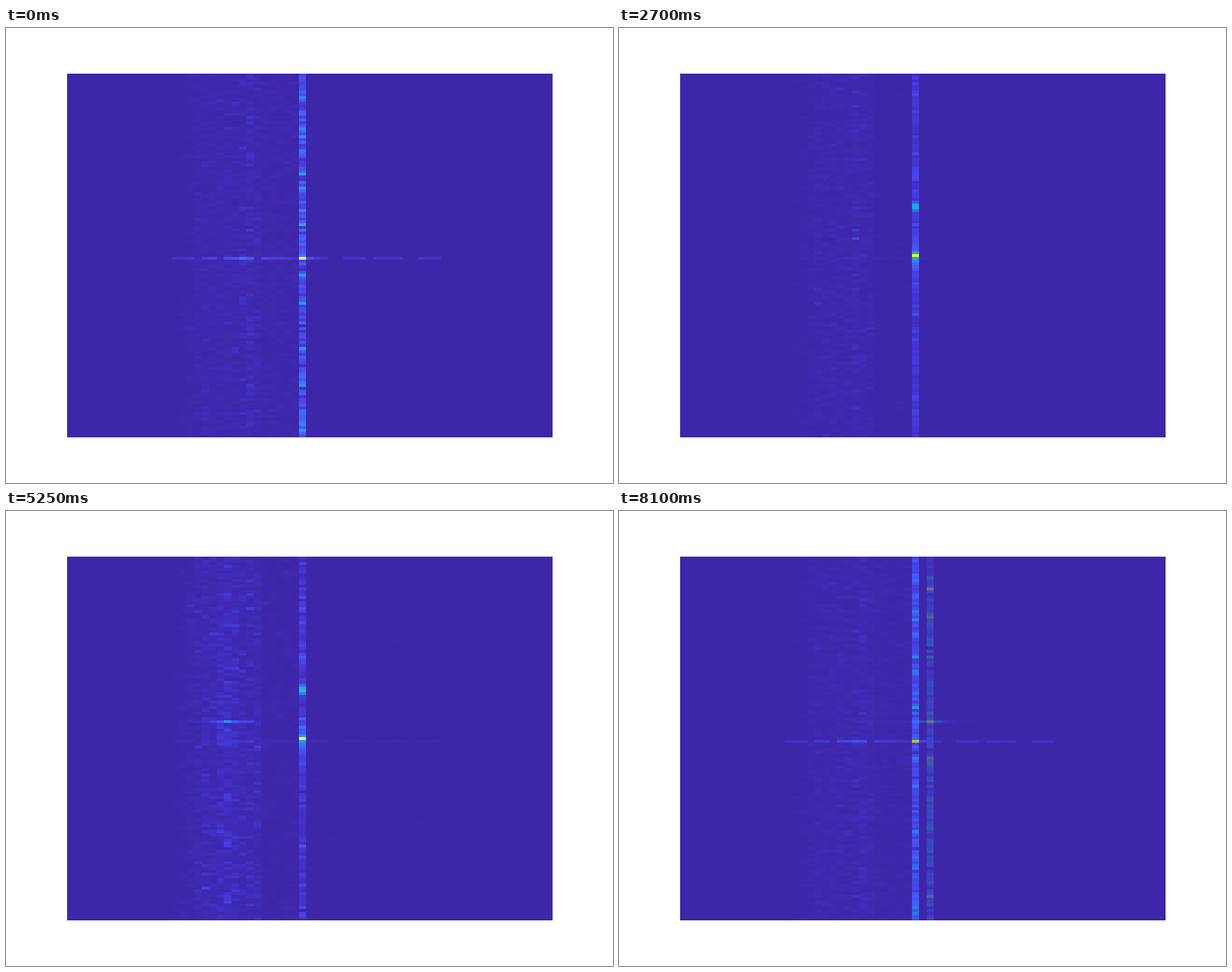
Animation, 864 px wide and 648 px high, one loop 8.25 s. Source, as a matplotlib script:

```python
import numpy as np
import matplotlib.pyplot as plt
from matplotlib.animation import FuncAnimation
from matplotlib.colors import LinearSegmentedColormap

WIDTH, HEIGHT, DPI = 864, 648, 100
ROWS, COLS = 129, 65
CENTRE, LINE_ROW, PEAK_ROW, ECHO_ROW, SIDE_ROW = 31, 65, 64, 46.6, 58
STEP_MS, STEPS_PER_SCENE, HOLD_STEPS = 150, 5, 3

rows, cols = np.arange(ROWS), np.arange(COLS)
parula = LinearSegmentedColormap.from_list("parula", [
    (0, "#3e26a8"), (.06, "#4537d5"), (.13, "#484df0"), (.2, "#4563fd"),
    (.26, "#317cfc"), (.33, "#2b91ee"), (.45, "#12b1d6"), (.5, "#1abebb"),
    (.6, "#48cb86"), (.7, "#9fc941"), (.8, "#ebbb30"), (.88, "#fec338"),
    (1, "#f9fb15")])


def falloff(positions, centre, width):
    return np.exp(-np.abs(positions - centre) / width)


def bump(positions, centre, width):
    return np.exp(-((positions - centre) / width) ** 2)


def speckle(seed, level, tail, ridge, gain, spread):
    """Faint noise left of the bright column, stronger around one ridge."""
    envelope = np.interp(cols, [13, 16, 18, 25, 26, 30, 31, 36, 49, 50],
                         [0, .5, 1, 1, tail, tail, .15, .1, .1, 0])
    envelope *= 1 + gain * bump(cols, ridge, spread) * (cols < 26)
    noise = np.random.default_rng(seed).gamma(2.5, .4, (ROWS, COLS))
    return level * envelope * noise


def column(seed, base, shape):
    return base * np.random.default_rng(seed).gamma(shape, 1 / shape, ROWS)


def dashes():
    """Broken horizontal line, brightest left of the column."""
    gaps = np.isin(cols, [17, 20, 25, 35, 36, 40, 45, 46])
    strength = .05 + .1 * bump(cols, 23, 4) + .08 * bump(cols, 32, .8)
    return strength * ((cols >= 14) & (cols < 50) & ~gaps)


def scene(seed, level, ridge, gain, spread, tail, line, wide=0):
    data = speckle(seed, level, tail, ridge, gain, spread)
    data[LINE_ROW] += line * dashes() + wide
    return data


def loud(seed, base, width, **look):
    """Strong, busy column with its peak on the line."""
    data = scene(seed, **look)
    data[:, CENTRE] = column(seed + 50, base, 4)
    data[:, CENTRE] += bump(rows, LINE_ROW, width)
    return data


def quiet(seed, echo, skirt, column_seed, side=(CENTRE, 0, 1), **look):
    """Weak column with a sharp peak, a second echo and a side reflection."""
    data = scene(seed, **look)
    pulse = bump(rows, PEAK_ROW, .6) + skirt * falloff(rows, PEAK_ROW + .6, 3)
    pulse += echo * bump(rows, ECHO_ROW, 1.4) + .06 * bump(rows, 35, 1.5)
    data[:, CENTRE] = column(column_seed, .06, 5) + pulse
    col, strength, reach = side
    data[SIDE_ROW] += strength * falloff(cols, col, reach) * (cols < 26)
    return data


def double(seed):
    """Second bright column to the right, peaking on the side row."""
    data = scene(seed, .008, 24, .3, 1, .8, .1)
    data[:, CENTRE] = column(seed + 50, .1, 5)
    data[:, CENTRE + 2] = column(seed + 51, .27, 3)
    data[SIDE_ROW] += falloff(cols, CENTRE + 2, .9) + .02 * (abs(cols - 36) < 14)
    return data


scenes = [
    loud(1, .17, .4, level=.012, ridge=24, gain=.8, spread=1, tail=.6, line=1),
    loud(2, .33, 1, level=.033, ridge=23, gain=.3, spread=2, tail=.55, line=1.6,
         wide=.015),
    loud(3, .24, 1, level=.028, ridge=23, gain=.3, spread=2, tail=.5, line=1.4,
         wide=.02),
    quiet(4, .4, .35, 60, (23, .08, .4), level=.009, ridge=23, gain=1, spread=.7,
          tail=.3, line=.1),
    quiet(4, .4, .35, 61, (23, .06, .4), level=.009, ridge=23, gain=1.2, spread=.7,
          tail=.3, line=.1),
    quiet(6, .45, .4, 62, (21, .1, 1), level=.024, ridge=22, gain=.4, spread=3,
          tail=.3, line=.4),
    quiet(7, .4, .65, 63, level=.022, ridge=22, gain=.4, spread=3, tail=.3,
          line=.3),
    quiet(8, .46, .35, 64, (21, .24, 1.5), level=.019, ridge=21, gain=.8, spread=1,
          tail=.25, line=.2),
    quiet(10, .36, .35, 65, level=.013, ridge=24, gain=1.2, spread=1.4, tail=.35,
          line=.2),
    quiet(10, .32, .35, 66, level=.013, ridge=24, gain=1.7, spread=1.4, tail=.35,
          line=.25),
    double(11),
]
colours = [parula(np.clip(data, 0, 1))[..., :3] for data in scenes]

fig = plt.figure(figsize=(WIDTH / DPI, HEIGHT / DPI), dpi=DPI, facecolor="white")
ax = fig.add_axes([87 / WIDTH, 65 / HEIGHT, 691 / WIDTH, 518 / HEIGHT])
ax.axis("off")
picture = ax.imshow(colours[0], aspect="auto", interpolation="nearest")


def update(frame):
    index, step = divmod(frame, STEPS_PER_SCENE)
    mix = max(0, step - HOLD_STEPS + 1) / (STEPS_PER_SCENE - HOLD_STEPS + 1)
    following = colours[(index + 1) % len(colours)]
    picture.set_data((1 - mix) * colours[index] + mix * following)
    return picture,


animation = FuncAnimation(fig, update, frames=len(scenes) * STEPS_PER_SCENE,
                          interval=STEP_MS, repeat=True, repeat_delay=0)
plt.show()
```
